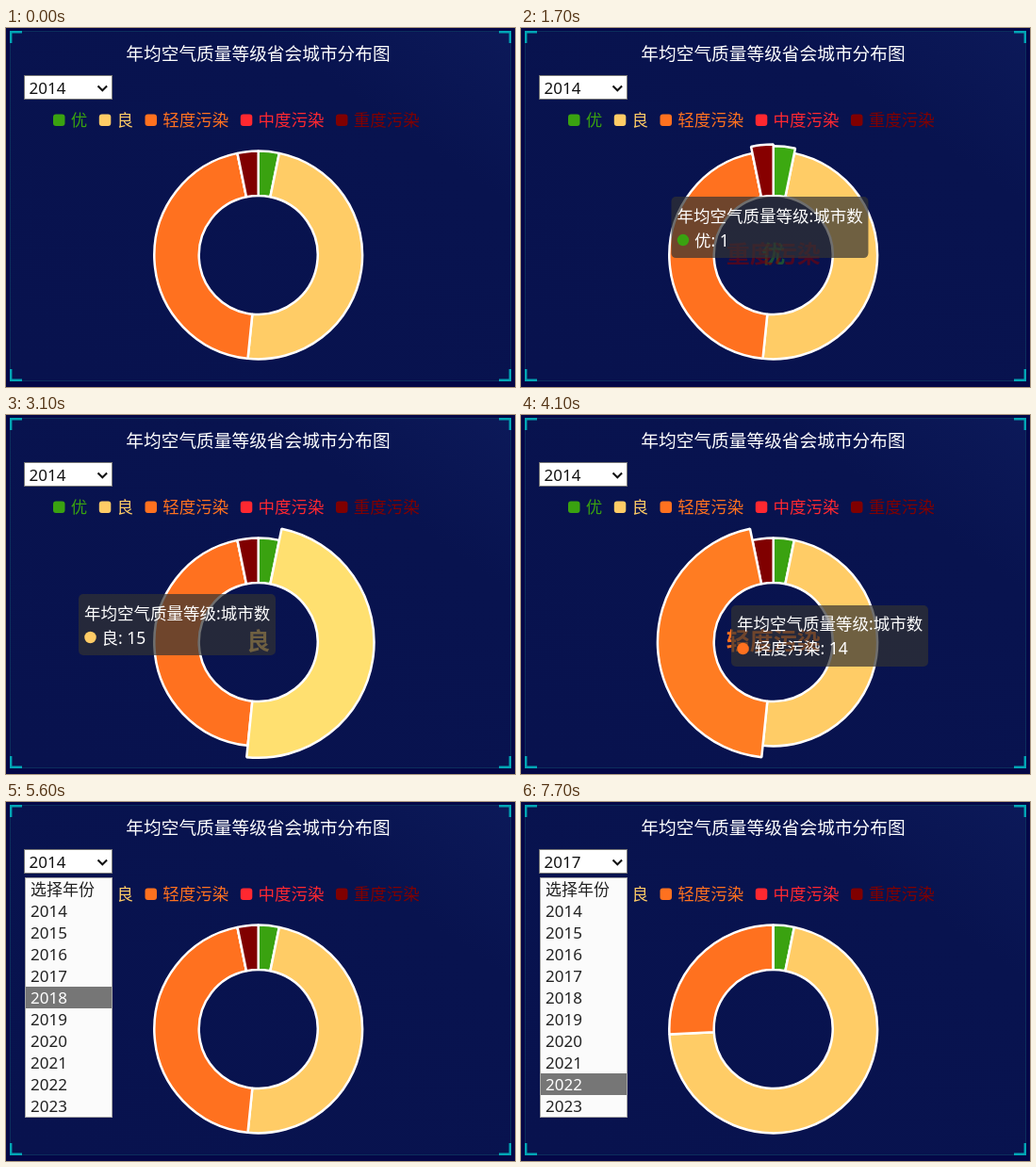
An HTML page for the animation above (8 s loop, 540 px wide and 381 px high).

```html
<!DOCTYPE html>
<html lang="zh-CN">
<head>
<meta charset="utf-8">
<style>
html, body { margin: 0; width: 100%; height: 100%; overflow: hidden; background: #040747; }
svg { display: block; font: 17.5px "Noto Sans", "Noto Sans CJK SC", "Noto Sans CJK", sans-serif; }
</style>
</head>
<body>
<svg id="stage" width="540" height="381" viewBox="0 0 540 381">
  <defs>
    <linearGradient id="panel" x1="0" y1="1" x2="1" y2="0">
      <stop offset="0" stop-color="#08124e"/>
      <stop offset=".75" stop-color="#08134f"/>
      <stop offset="1" stop-color="#0c1959"/>
    </linearGradient>
  </defs>
  <rect width="540" height="381" fill="#040747"/>
  <rect x="4.5" y="3.5" width="531" height="371" fill="url(#panel)" stroke="#0b2e5c"/>
  <path d="M5.2 16V4.2H17M523 4.2H534.8V16M534.8 362V373.8H523M17 373.8H5.2V362" fill="none" stroke="#02a6b5" stroke-width="2.4"/>
  <text x="267.5" y="34" font-size="18.7" fill="#fff" text-anchor="middle">年均空气质量等级省会城市分布图</text>
  <g id="legend"></g>
  <g id="pie" stroke="#fff" stroke-width="2.5" stroke-linejoin="bevel"></g>
  <g id="labels" font-size="25" font-weight="700" text-anchor="middle"></g>
  <g id="tip" fill="#fff">
    <rect width="209" height="65" rx="5" fill="#323232" fill-opacity=".7"/>
    <text x="6" y="26.5">年均空气质量等级:城市数</text>
    <circle id="dot" cx="12.5" cy="46" r="6.25"/>
    <text id="tipText" x="24.5" y="52.5"></text>
  </g>
  <rect x="19.5" y="50.5" width="93" height="25" fill="#fff" stroke="#767676"/>
  <g id="ring" fill="none">
    <rect x="18" y="49" width="96" height="28" rx="3" stroke="#fff" stroke-width="1.5"/>
    <rect x="19.7" y="50.7" width="92.6" height="24.6" rx="2" stroke="#101010" stroke-width="2"/>
  </g>
  <text id="year" x="24.5" y="70" font-size="17" fill="#111"></text>
  <path d="M97.5 61.5L102.3 66.3L107.1 61.5" fill="none" stroke="#111" stroke-width="2"/>
  <g id="menu" font-size="17">
    <rect x="20.5" y="80.5" width="92" height="254" fill="#fbfbfb" stroke="#a5a5a5"/>
    <rect id="bar" x="21" width="91" height="23" fill="#767676"/>
  </g>
</svg>
<script>
const $ = id => document.getElementById(id);
const LOOP = 8000, CX = 267.7, CY = 241, R0 = 63, R1 = 110.4, GROW = 12.4;
const series = [
  { name: '优', rgb: [58, 162, 16], x: 50, counts: [1, 1] },
  { name: '良', rgb: [255, 204, 102], x: 98.8, counts: [15, 22] },
  { name: '轻度污染', rgb: [255, 113, 31], x: 147.5, counts: [14, 8] },
  { name: '中度污染', rgb: [255, 40, 48], x: 248.8, counts: [0, 0] },
  { name: '重度污染', rgb: [128, 0, 0], x: 350, counts: [1, 0] }
];
// slice index, start, end
const hovers = [[4, 250, 1650], [0, 1650, 2650], [1, 2650, 3750], [2, 3750, 4150]];
// time, x, y of the tooltip
const tipStops = [[0, 272, 171], [1000, 287, 188], [1650, 29, 170], [2650, 77, 190], [3750, 223, 202]];
// time, highlighted menu row
const rowStops = [[0, 1], [5350, 3], [5450, 4], [5550, 5], [5750, 4],
  [6950, 5], [7150, 6], [7350, 7], [7500, 8], [7650, 9]];

const clamp = v => Math.min(1, Math.max(0, v));
const easeOut = (v, power) => 1 - (1 - clamp(v)) ** power;
const easeInOut = v => v < .5 ? 4 * v ** 3 : 1 - 4 * (1 - v) ** 3;
const css = (rgb, lift = 0) => `rgb(${rgb.map(c => Math.min(255, c * (1 + lift / 10)))})`;

function add(parent, tag, attrs, text = '') {
  const el = document.createElementNS('http://www.w3.org/2000/svg', tag);
  for (const key in attrs) el.setAttribute(key, attrs[key]);
  el.textContent = text;
  parent.append(el);
  return el;
}

for (const s of series) {
  const fill = css(s.rgb);
  add($('legend'), 'rect', { x: s.x, y: 91.5, width: 12.5, height: 12.5, rx: 3, fill });
  add($('legend'), 'text', { x: s.x + 18.7, y: 103.6, fill }, s.name);
  s.slice = add($('pie'), 'path', {});
  s.label = add($('labels'), 'text', { x: CX, y: 249, fill }, s.name);
}
const rows = ['选择年份', ...Array.from({ length: 10 }, (_, i) => 2014 + i)].map((name, i) =>
  add($('menu'), 'text', { x: 26, y: 99 + i * 23 }, name));

function sector(a, b, r) {
  const at = (angle, radius) => `${CX + radius * Math.sin(angle)} ${CY - radius * Math.cos(angle)}`;
  const big = +(b - a > Math.PI);
  return `M${at(a, R0)}L${at(a, r)}A${r} ${r} 0 ${big} 1 ${at(b, r)}L${at(b, R0)}A${R0} ${R0} 0 ${big} 0 ${at(a, R0)}Z`;
}

function drawPie(t) {
  const mix = easeInOut(clamp((t - 6150) / 550));
  let angle = 0;
  series.forEach((s, i) => {
    const count = s.counts[0] + (s.counts[1] - s.counts[0]) * mix;
    const end = angle + count / 31 * 2 * Math.PI;
    const hover = hovers.find(h => h[0] === i);
    s.lift = hover ? easeOut((t - hover[1]) / 300, 3) - easeOut((t - hover[2]) / 300, 3) : 0;
    s.slice.setAttribute('d', sector(angle, end, R1 + GROW * s.lift));
    s.slice.setAttribute('fill', css(s.rgb, s.lift));
    s.label.setAttribute('opacity', s.lift);
    angle = end;
  });
  $('pie').append(...[...series].sort((a, b) => a.lift - b.lift).map(s => s.slice));
}

function drawTip(t) {
  let [, x, y] = tipStops[0];
  for (const [start, tx, ty] of tipStops) {
    const k = easeOut((t - start) / 400, 5);
    x += (tx - x) * k;
    y += (ty - y) * k;
  }
  const s = series[hovers.findLast(h => t >= h[1])?.[0] ?? 4];
  $('tip').setAttribute('transform', `translate(${x} ${y})`);
  $('tip').setAttribute('opacity', clamp((t - 750) / 200) - clamp((t - 4250) / 200));
  $('dot').setAttribute('fill', css(s.rgb));
  $('tipText').textContent = `${s.name}: ${s.counts[0]}`;
}

function drawSelect(t) {
  const row = rowStops.findLast(r => t >= r[0])[1];
  const opened = t < 6050 ? 5050 : 6850;
  $('year').textContent = t < 6050 ? 2014 : 2017;
  $('ring').setAttribute('opacity', +(t >= 6050 && t < 6850));
  $('menu').setAttribute('opacity', clamp((t - opened) / 100));
  $('bar').setAttribute('y', 81 + row * 23);
  rows.forEach((el, i) => el.setAttribute('fill', i === row ? '#fff' : '#222'));
}

function draw() {
  const t = performance.now() % LOOP;
  drawPie(t);
  drawTip(t);
  drawSelect(t);
  requestAnimationFrame(draw);
}
draw();
</script>
</body>
</html>
```
